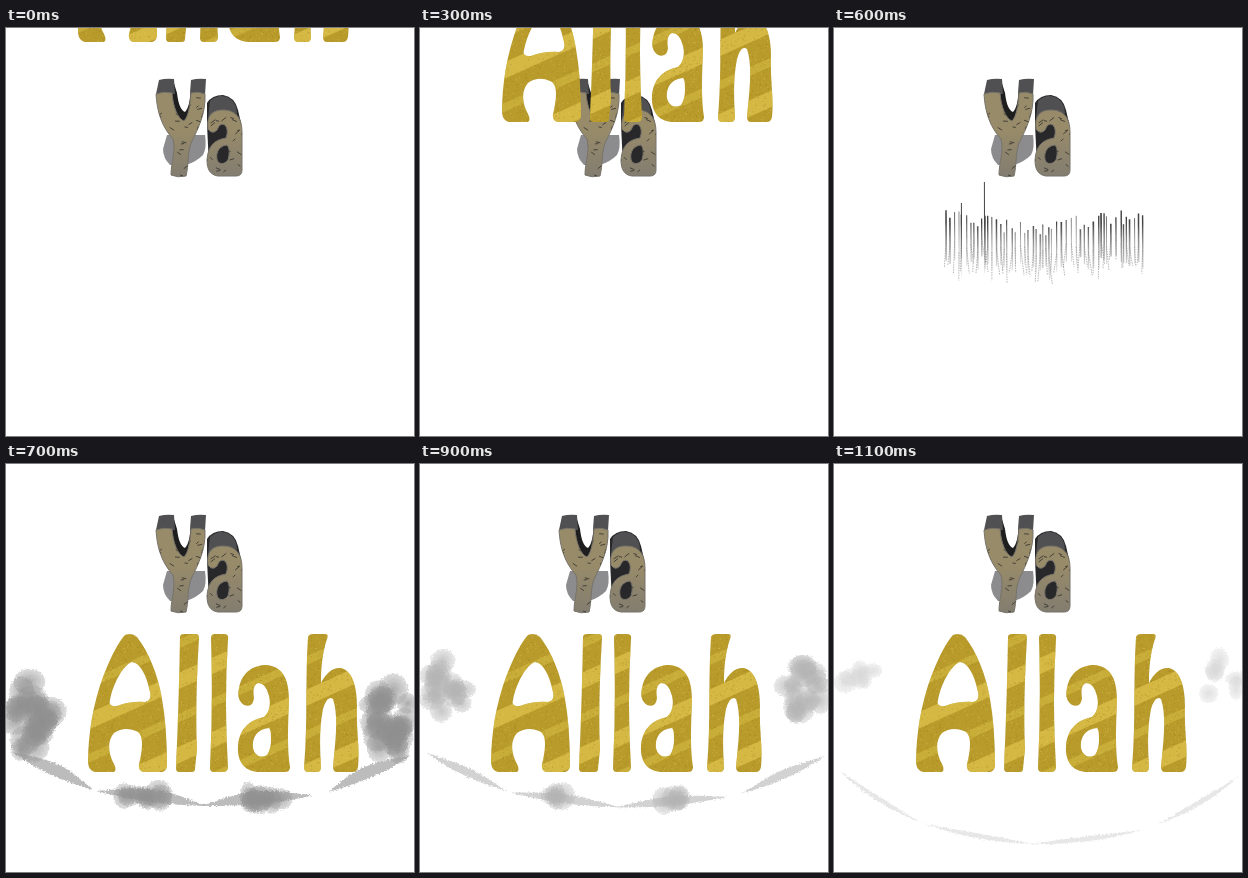
Write an HTML page that moves like this. It is 408 px wide and 408 px high and loops after 1.2 s.

```html
<!DOCTYPE html>
<html lang="en">
<head>
<meta charset="utf-8">
<title>Ya Allah</title>
<style>
html, body { margin: 0; width: 100%; height: 100%; overflow: hidden; background: #fff; }
svg { display: block; width: 100vw; height: 100vh; }
</style>
</head>
<body>
<svg viewBox="0 0 408 408" role="img" aria-label="Ya Allah">
  <defs>
    <clipPath id="goldClip" clip-rule="evenodd">
      <path d="M82 299C82 270 87 240 97 213C105 192 113 177 119 171Q126 168 131 173C142 187 152 210 156 235Q161 262 161 302Q160 308 155 308H138Q132 307 133 300C136 288 139 270 130 267Q118 262 108 269C101 277 102 289 108 300Q111 306 108 308H89Q83 307 82 299Z
        M104 236Q102 243 111 242Q125 237 139 238Q146 237 144 228C140 210 134 199 126 198C117 201 107 220 104 236Z"/>
      <path d="M174 173Q174 170 178 170H190Q193 170 193 174Q189 240 191 285L189 305Q189 308 186 308H173Q170 308 170 304Q173 235 174 173Z"/>
      <path d="M205 174Q205 170 209 170H218Q223 170 222 175Q218 240 222 303Q222 308 217 308H208Q204 308 204 304Q207 240 205 174Z"/>
      <path d="M238 241Q230 236 233 224C236 207 249 201 260 201C276 202 283 214 283 236C282 262 281 285 284 303Q284 308 279 308H254C238 308 231 297 232 282C233 266 243 256 258 253Q266 246 263 232Q260 219 252 219Q246 221 248 234Q247 244 238 241Z
        M263 264C250 265 246 275 247 284C249 293 256 294 261 291Q265 285 265 276Q265 265 263 264Z"/>
      <path d="M302 173Q303 170 307 170H319Q323 170 321 175C316 190 315 205 315 219C320 209 327 203 335 204C347 207 351 224 351 242C350 266 354 284 352 303Q351 308 347 308H331Q327 308 327 303C329 280 333 253 327 235Q321 231 317 245C313 265 314 285 315 303Q315 308 311 308H302Q298 308 298 303C302 258 299 216 302 173Z"/>
    </clipPath>
    <path id="yFront" d="M150 66Q158 63 166 65C167 79 172 91 178 93C183 88 184 76 185 65Q192 63 199 66C200 85 192 101 186 113C181 123 183 137 180 148Q172 150 165 147C165 134 170 124 167 111C156 99 151 84 150 66Z"/>
    <path id="aFront" fill-rule="evenodd" d="M202 101C200 87 207 82 217 82C230 82 236 90 236 104V142Q236 148 230 148H212C204 147 201 141 201 132C202 118 208 112 220 110Q223 102 219 97Q214 94 211 102Q206 107 202 101ZM221 117C211 118 209 128 212 134Q217 138 222 132Q225 121 221 117Z"/>
    <clipPath id="stoneClip"><use href="#yFront"/><use href="#aFront" clip-rule="evenodd"/></clipPath>
    <linearGradient id="stone" gradientUnits="userSpaceOnUse" x1="0" x2="0" y1="65" y2="148">
      <stop offset=".45" stop-color="#988b6a"/><stop offset="1" stop-color="#837d70"/>
    </linearGradient>
    <linearGradient id="fade" gradientUnits="userSpaceOnUse" x1="0" x2="0" y1="195" y2="248">
      <stop stop-color="#444"/><stop offset="1" stop-color="#888" stop-opacity=".1"/>
    </linearGradient>
    <radialGradient id="puff">
      <stop stop-color="#8a8a8a" stop-opacity=".75"/><stop offset="1" stop-color="#8a8a8a" stop-opacity=".3"/>
    </radialGradient>
    <filter id="rough" x="-10%" y="-10%" width="120%" height="120%">
      <feTurbulence type="fractalNoise" baseFrequency=".6" numOctaves="2" seed="4"/>
      <feDisplacementMap in="SourceGraphic" scale="4" xChannelSelector="R" yChannelSelector="G"/>
    </filter>
  </defs>
  <rect width="408" height="408" fill="#fff"/>
  <g id="dust" filter="url(#rough)"></g>
  <g id="ya">
    <path fill="#8c8c8e" d="M161 107H199Q201 120 197 127Q190 134 180 137H164Q157 130 157 121Z"/>
    <path fill="#1e1e1e" d="M167 52L171 65Q173 82 179 84Q185 78 185 52L191 66L181 106H170L163 80Z"/>
    <path fill="#505052" d="M153 52Q160 50 168 51L169 66H150ZM185 52Q192 50 200 51L199 67H184Z"/>
    <path fill="#28282a" d="M201 96V75Q206 67 217 67Q229 69 232 82L235 95V110L222 138H203Z"/>
    <path fill="#505052" d="M204 73Q213 65 223 70Q231 75 231 86Q215 77 202 90Z"/>
    <g fill="url(#stone)" stroke="#77736a"><use href="#yFront"/><use href="#aFront"/></g>
    <path id="cracks" clip-path="url(#stoneClip)" fill="none" stroke="#3c3932" stroke-width=".9"/>
  </g>
  <g id="streaks" fill="none"></g>
  <g id="gold"><g clip-path="url(#goldClip)">
    <rect x="78" y="166" width="280" height="146" fill="#b99b2b"/>
    <g id="shine" stroke="#e2c850"></g>
    <path id="darkGrain" stroke="#8f741b" opacity=".4"/>
    <path id="lightGrain" stroke="#ecd56d" opacity=".4"/>
  </g></g>
</svg>
<script>
const $ = id => document.getElementById(id);
const FRAME_MS = 100, FRAMES = 12, IMPACT = 7;

function randomizer(seed) {
  return (low, high) => {
    seed = (seed * 16807) % 2147483647;
    return low + (high - low) * seed / 2147483647;
  };
}

const repeat = (count, make) => Array.from({ length: count }, (_, i) => make(i)).join('');

function grain(count, seed) {
  const rnd = randomizer(seed);
  return repeat(count, () => `M${rnd(80, 354)} ${rnd(168, 310)}h1`);
}

function cracks() {
  const rnd = randomizer(91);
  return repeat(70, () => `M${rnd(150, 236)} ${rnd(65, 148)}l${rnd(2, 5)} ${rnd(-4, 3)}`);
}

// Parallel diagonal bands, wide and narrow in turn.
const shine = () => repeat(6, i =>
  `<path d="M70 ${226 + 37 * i}l290 -130" stroke-width="${i % 2 ? 15 : 8}" opacity="${i % 2 ? .65 : .4}"/>`);

function streaks() {
  const rnd = randomizer(733);
  let lines = '', hatch = '';
  for (let x = 112; x <= 312; x += rnd(2.2, 5.6)) {
    const sag = 13 * Math.exp(-(((x - 200) / 45) ** 2));
    const top = rnd(182, 197) + sag;
    const end = rnd(226, 242) + sag / 2;
    lines += `<path d="M${x} ${top}L${x + .2} ${end}" stroke-width="${rnd(.6, 1.7)}"/>`;
    hatch += `M${x} ${end - 18}l${rnd(-3, 4)} ${rnd(18, 32)}`;
  }
  return `<g stroke="url(#fade)">${lines}<path d="M150.4 154L150.6 245M127.4 175L127.6 250"/></g>
    <path d="${hatch}" stroke="#888" stroke-width=".6" stroke-dasharray="1.5 1"/>`;
}

const mix = (a, b, k) => a + (b - a) * k;

// Dust lies on an ellipse around the word that widens downwards with age.
function ringPoint(degrees, age, inset = 0) {
  const a = degrees * Math.PI / 180;
  const height = 112 + 38 * (Math.max(0, age - 1) / 3) ** 3;
  return [208 + (235 - inset) * Math.cos(a), 230 + (height - inset) * Math.sin(a)];
}

function sweep(center, age) {
  const steps = 12, half = 14, edge = [], back = [];
  for (let i = 0; i <= steps; i++) {
    const angle = center + half * (1 - 2 * i / steps);
    const thickness = (13 - 2 * age) * Math.sin(Math.PI * i / steps);
    edge.push(ringPoint(angle, age));
    back.unshift(ringPoint(angle, age, thickness));
  }
  return `<path d="M${[...edge, ...back].join('L')}Z" fill="#8a8a8a" fill-opacity=".6"/>`;
}

function clump(x, y, spreadX, spreadY, count, size, rnd) {
  return repeat(count, () => {
    const angle = rnd(0, 2 * Math.PI), far = Math.sqrt(rnd(0, 1));
    return `<ellipse cx="${x + spreadX * far * Math.cos(angle)}" cy="${y + spreadY * far * Math.sin(angle)}"
      rx="${size * rnd(.7, 1.2)}" ry="${size * rnd(.7, 1.2)}" fill="url(#puff)"/>`;
  });
}

// The side clouds rise and thin out while the sweeps fall away.
function dust(age) {
  const rnd = randomizer(57 + age);
  const rise = 1 - Math.exp(-1.2 * Math.max(0, age - 1));
  const count = 24 - 4.5 * age, size = 14 - age;
  const sides = [28, 386].map(x =>
    clump(x, mix(256, 212, rise), mix(20, 18, rise), mix(40, 26, rise), count, size, rnd));
  const ground = [107, 79].map(angle => {
    const [x, y] = ringPoint(angle, age);
    return clump(x, y - 5, 22 - 6 * age, 4, 8 - 2 * age, 12, rnd);
  });
  const sweeps = [135, 106, 79, 47].map(angle => sweep(angle, age));
  return `<g opacity="${.95 - .15 * age}">${[...sides, ...ground, ...sweeps].join('')}</g>`;
}

const shakes = [[0, 0], [5, 2], [-11, 0], [0, 0], [0, 0]];
const place = (node, [x, y]) => node.setAttribute('transform', `translate(${x} ${y})`);
const show = (node, visible) => node.setAttribute('visibility', visible ? 'visible' : 'hidden');

function render(step) {
  const age = step - IMPACT;
  const landed = age >= 0, streaking = age === -1;
  const shake = landed ? shakes[age] : [0, 0];
  const drop = [-10 * Math.max(0, 1 - step), -294 + 28 * step - .45 * step ** 2];
  place($('ya'), shake);
  place($('gold'), landed ? shake : drop);
  show($('gold'), !streaking);
  show($('streaks'), streaking);
  $('dust').innerHTML = landed ? dust(age) : '';
}

$('cracks').setAttribute('d', cracks());
$('darkGrain').setAttribute('d', grain(1500, 17));
$('lightGrain').setAttribute('d', grain(1100, 29));
$('shine').innerHTML = shine();
$('streaks').innerHTML = streaks();

const start = performance.now();
let shown = -1;
function tick() {
  const step = Math.floor((performance.now() - start) / FRAME_MS) % FRAMES;
  if (step !== shown) render(shown = step);
  requestAnimationFrame(tick);
}
tick();
</script>
</body>
</html>
```
